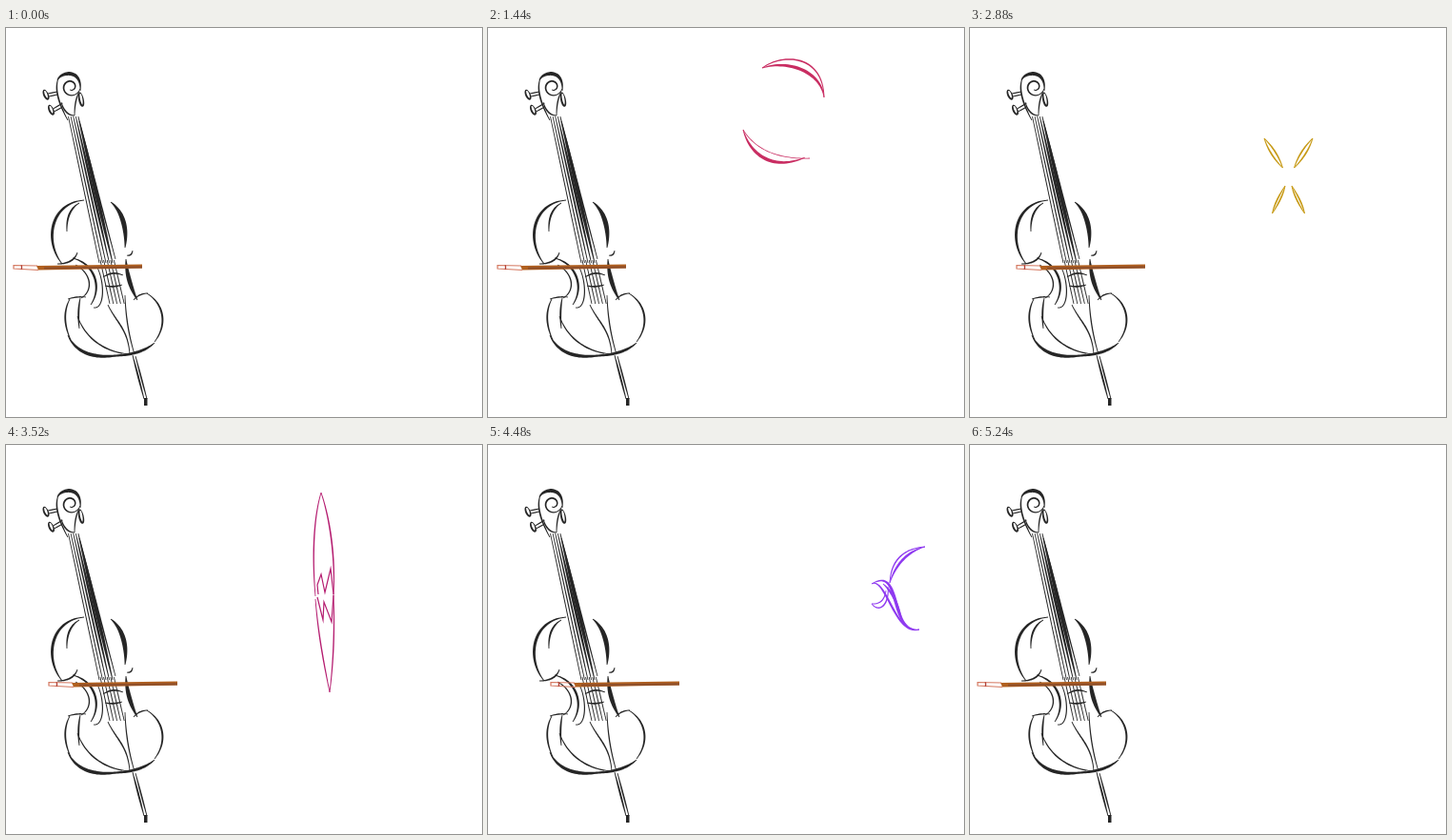
Recreate the animation shown at these times as an HTML page with a canvas. Size 500 by 409 pixels, loop 5360 ms.

```html
<!DOCTYPE html>
<html lang="en">
<head>
<meta charset="utf-8">
<title>Cello</title>
<style>
html, body { margin: 0; width: 100%; height: 100%; overflow: hidden; background: #fff; }
canvas { display: block; }
</style>
</head>
<body>
<canvas id="stage" width="500" height="409"></canvas>
<script>
const LOOP = 5360;
const stage = document.getElementById('stage');
const cello = document.createElement('canvas');
cello.width = stage.width;
cello.height = stage.height;
let ctx = cello.getContext('2d');

const still = p => p;
let place = still;

const mix = (a, b, u) => a + (b - a) * u;
const part = (t, a, b) => Math.max(0, Math.min(1, (t - a) / (b - a)));
const ease = u => (1 - Math.cos(Math.PI * u)) / 2;

// Scale and turn about an origin, then move that origin
function pose(ox, oy, x, y, sx = 1, sy = sx, turn = 0) {
  const c = Math.cos(turn), s = Math.sin(turn);
  place = ([px, py]) => {
    const dx = (px - ox) * sx, dy = (py - oy) * sy;
    return [x + dx * c - dy * s, y + dx * s + dy * c];
  };
}

function pairs(xy) {
  const out = [];
  for (let i = 0; i < xy.length; i += 2) out.push([xy[i], xy[i + 1]]);
  return out;
}

// Point on a Bezier curve with any number of control points
function bezier(p, u) {
  while (p.length > 1) {
    p = p.slice(1).map((q, i) => [mix(p[i][0], q[0], u), mix(p[i][1], q[1], u)]);
  }
  return p[0];
}

const sample = (at, n = 32) => Array.from({ length: n + 1 }, (_, i) => at(i / n));

function fill(pts) {
  ctx.beginPath();
  pts.forEach(p => ctx.lineTo(...p));
  ctx.fill();
}

// Fill a line that swells to width w and thins at its ends
function swell(w, points) {
  const pts = points.map(place), last = pts.length - 1, thin = .8;
  const left = [], right = [];
  pts.forEach(([x, y], i) => {
    const a = pts[Math.max(0, i - 1)], b = pts[Math.min(last, i + 1)];
    const dx = b[0] - a[0], dy = b[1] - a[1], len = Math.hypot(dx, dy) || 1;
    const h = (thin + Math.max(0, w - thin) * Math.sin(Math.PI * i / last)) / 2;
    left.push([x - dy / len * h, y + dx / len * h]);
    right.unshift([x + dy / len * h, y - dx / len * h]);
  });
  fill(left.concat(right));
}

function brush(w, ...xy) {
  const p = pairs(xy);
  swell(w, sample(u => bezier(p, u)));
}

function oval(w, x, y, rx, ry, turn = 0) {
  swell(w, sample(u => {
    const a = u * 2 * Math.PI - .8, c = Math.cos(a) * rx, s = Math.sin(a) * ry;
    return [x + c * Math.cos(turn) - s * Math.sin(turn), y + c * Math.sin(turn) + s * Math.cos(turn)];
  }));
}

function zigzag(...xy) {
  ctx.beginPath();
  pairs(xy).map(place).forEach(p => ctx.lineTo(...p));
  ctx.lineWidth = 1.2;
  ctx.stroke();
}

function paint(color) {
  ctx.fillStyle = ctx.strokeStyle = color;
}

function drawHead() {
  brush(3.8, 54, 55, 57, 46, 80, 42, 78, 66);
  brush(1.7, 55, 53, 49, 68, 65, 97);
  brush(1.4, 77, 67, 72, 76, 72, 92);
  brush(1.6, 58, 78, 62, 92, 72, 92);
  swell(1.8, sample(u => {
    const a = .2 + u * 8, r = mix(10, 3, u);
    return [68 + r * Math.cos(a), 62 + r * Math.sin(a)];
  }));
  for (let i = 0; i < 2; i++) {
    const x = 42 + i * 5.5, y = 70 + i * 16;
    oval(2, x, y, 2, 5, -.4);
    brush(1.3, x + 2, y - 1, x + 12, y - 3 - i * 4);
    brush(1.2, x + 3, y + 2, x + 12, y - i * 3);
  }
  oval(2, 79, 75, 2, 7, -.2);
}

function drawStrings() {
  for (let i = 0; i < 5; i++) {
    brush(1 + i * i * .18, 65.5 + i * 2.6, 93, 98 + i * 3.5, 247);
    brush(1, 99 + i * 3.6, 244, 109 + i * 3.8, 290);
  }
  brush(1.8, 77, 98, 85, 130, 115, 243);
}

function drawBody() {
  // upper part
  brush(3, 82, 181, 46, 184, 40, 225, 59, 248);
  brush(2, 77, 184, 63, 192, 64, 214);
  brush(5, 110, 183, 124, 194, 127, 214, 125, 231);
  brush(1.5, 133, 234, 132, 240, 127, 239);
  brush(1.8, 54, 248, 71, 248, 75, 236);
  // waist
  brush(2.4, 70, 242, 92, 247, 102, 272, 89, 291);
  brush(1.4, 73, 249, 90, 258, 92, 276, 79, 284);
  brush(1.2, 95, 250, 104, 266, 104, 296, 92, 294);
  brush(4.6, 126, 243, 127, 266, 138, 286);
  brush(1.4, 134, 286, 140, 279, 149, 279);
  brush(1.4, 65, 285, 74, 282, 84, 283);
  // bridge and tailpiece
  brush(1.7, 102, 262, 112, 255, 123, 260);
  brush(1.8, 104, 271, 113, 273, 122, 270);
  brush(1.5, 107, 291, 116, 310, 128, 316, 130, 343);
  brush(1.3, 125, 281, 126, 314, 135, 343);
  // lower part
  brush(1.8, 67, 285, 57, 304, 68, 328);
  brush(3.6, 65, 323, 75, 346, 102, 348, 122, 343);
  brush(3, 110, 345, 142, 344, 156, 331);
  brush(2, 148, 279, 166, 290, 170, 312, 156, 330);
  brush(1.9, 78, 284, 75, 298, 77, 316);
  brush(1.5, 75, 303, 84, 328, 106, 342, 132, 343);
  // endpin
  brush(1.9, 133, 344, 145, 390);
  brush(1.6, 136, 345, 148, 390);
  ctx.fillRect(145, 389, 3.5, 8);
}

// Turning points of the bow: time, shift
const turns = pairs([0, 0, 840, 40, 1680, -7, 1920, -7, 3000, 43,
  3440, 26, 3520, 37, 4320, 64, 5160, 0, LOOP, 0]);

function bowAt(t) {
  const i = turns.findIndex(k => k[0] > t);
  const [a, x] = turns[i - 1], [b, y] = turns[i];
  return Math.round(mix(x, y, ease(part(t, a, b))));
}

function drawBow(x) {
  pose(0, 0, x, 0);
  const slab = (...xy) => fill(pairs(xy).map(place));
  paint('#b1601f');
  slab(32, 250, 143, 248.6, 143, 252.4, 34, 254.4);
  paint('#8f4f2a');
  slab(40, 251.6, 143, 250.2, 143, 252.4, 40, 253.6);
  paint('#d4775f');
  zigzag(33, 250, 8, 249.5, 8, 253, 34, 254.5);
  paint('#b03d33');
  brush(1.4, 16, 249, 17, 252, 16, 254);
  place = still;
}

function ribbon(u) {
  const path = pairs([172, 238, 300, 225, 250, 120, 287, 34]);
  const tail = Math.max(0, u - .3);
  paint('#c62a58');
  swell(3, sample(v => bezier(path, mix(tail, u, v))));
}

function crescents() {
  paint('#c92d62');
  brush(1.6, 288, 42, 310, 26, 352, 28, 353, 73);
  brush(3.4, 288, 42, 316, 33, 350, 46, 353, 73);
  brush(3.4, 268, 107, 276, 136, 302, 150, 333, 136);
  brush(.8, 268, 107, 282, 130, 308, 138, 338, 137);
}

function ring() {
  paint('#8d2295');
  oval(2.4, 328.5, 159.5, 11.5, 11);
}

function blades() {
  paint('#c79a16');
  for (const side of [-1, 1]) {
    const lens = (x, y, x2, y2) => [-4, 4].forEach(bend =>
      brush(1.7, 334.5 + side * x, y, 334.5 + side * ((x + x2) / 2 + bend), (y + y2) / 2 + bend / 2,
        334.5 + side * x2, y2));
    lens(25.5, 116, 6, 147);
    lens(17, 195, 3.5, 166);
  }
}

function spindle() {
  paint('#b51d70');
  brush(1.4, 331, 50, 322, 80, 322, 125, 325, 159);
  brush(1.6, 331, 50, 341, 80, 346, 120, 344, 158);
  brush(1.4, 325, 162, 328, 200, 334, 230, 340, 260);
  brush(1.4, 344, 158, 346, 212, 340, 260);
  zigzag(328, 157, 327, 147, 331, 136, 335, 155, 341, 130, 344, 157);
  zigzag(327, 160, 333, 184, 334, 165, 342, 186, 344, 158);
}

function curl() {
  paint('#8f3af0');
  brush(1.5, 422, 145, 424, 110, 459, 107);
  brush(2.6, 422, 145, 428, 126, 440, 112, 459, 107);
  brush(3.2, 403, 146, 436, 126, 420, 198, 453, 194);
  brush(2.2, 403, 146, 418, 138, 428, 202, 453, 194);
  brush(2.6, 415, 146, 427, 156, 434, 180);
  brush(1.5, 403, 167, 412, 178, 422, 166, 420, 149);
  brush(1.3, 403, 167, 416, 168, 418, 153);
}

function drawEffect(t) {
  if (t < 80 || t >= 5240) return;
  if (t < 1200) {
    ribbon(t < 640 ? mix(.06, .46, part(t, 80, 560)) : mix(.54, 1, part(t, 640, 1120)));
  } else if (t < 1760) {
    pose(311, 87, 311, 87, 1, 1, (t - 1440) * .004);
    crescents();
  } else if (t < 2360) {
    pose(328.5, 159.5, 328.5, 159.5, mix(3.8, 1, part(t, 1760, 2200)));
    ring();
  } else if (t < 2920) {
    const s = mix(.35, 1, part(t, 2360, 2720));
    pose(334, 157, 334, 157, s, s, (t - 2880) * .004);
    blades();
  } else if (t < 3520) {
    const u = part(t, 2920, 3440);
    pose(334, 157, 334, 157, mix(4.6, 1.2, u), mix(.4, .95, u));
    spindle();
  } else if (t < 4080) {
    const u = part(t, 3680, 4000), grow = mix(1, 1.25, part(t, 3520, 3680));
    pose(334, 157, mix(334, 425, u), mix(157, 150, u), mix(1, 1.6, u), mix(grow, .6, u), u * 1.2);
    spindle();
  } else if (t < 4640) {
    pose(431, 150, 431, 150, mix(2.2, 1, part(t, 4080, 4480)));
    curl();
  } else {
    const u = part(t, 4640, 5160);
    pose(431, 150, mix(412, 332, u), mix(150, 165, u), mix(.75, 1.75, u));
    curl();
  }
  place = still;
}

paint('#262626');
drawHead();
drawStrings();
drawBody();
ctx = stage.getContext('2d');
const start = performance.now();

function frame() {
  let t = (performance.now() - start) % LOOP;
  const step = t < 1200 || (t >= 4080 && t < 4640) ? 80 : 40;
  t = Math.floor(t / step) * step;
  paint('#fff');
  ctx.fillRect(0, 0, stage.width, stage.height);
  ctx.drawImage(cello, 0, 0);
  drawBow(bowAt(t));
  drawEffect(t);
  requestAnimationFrame(frame);
}
frame();
</script>
</body>
</html>
```
